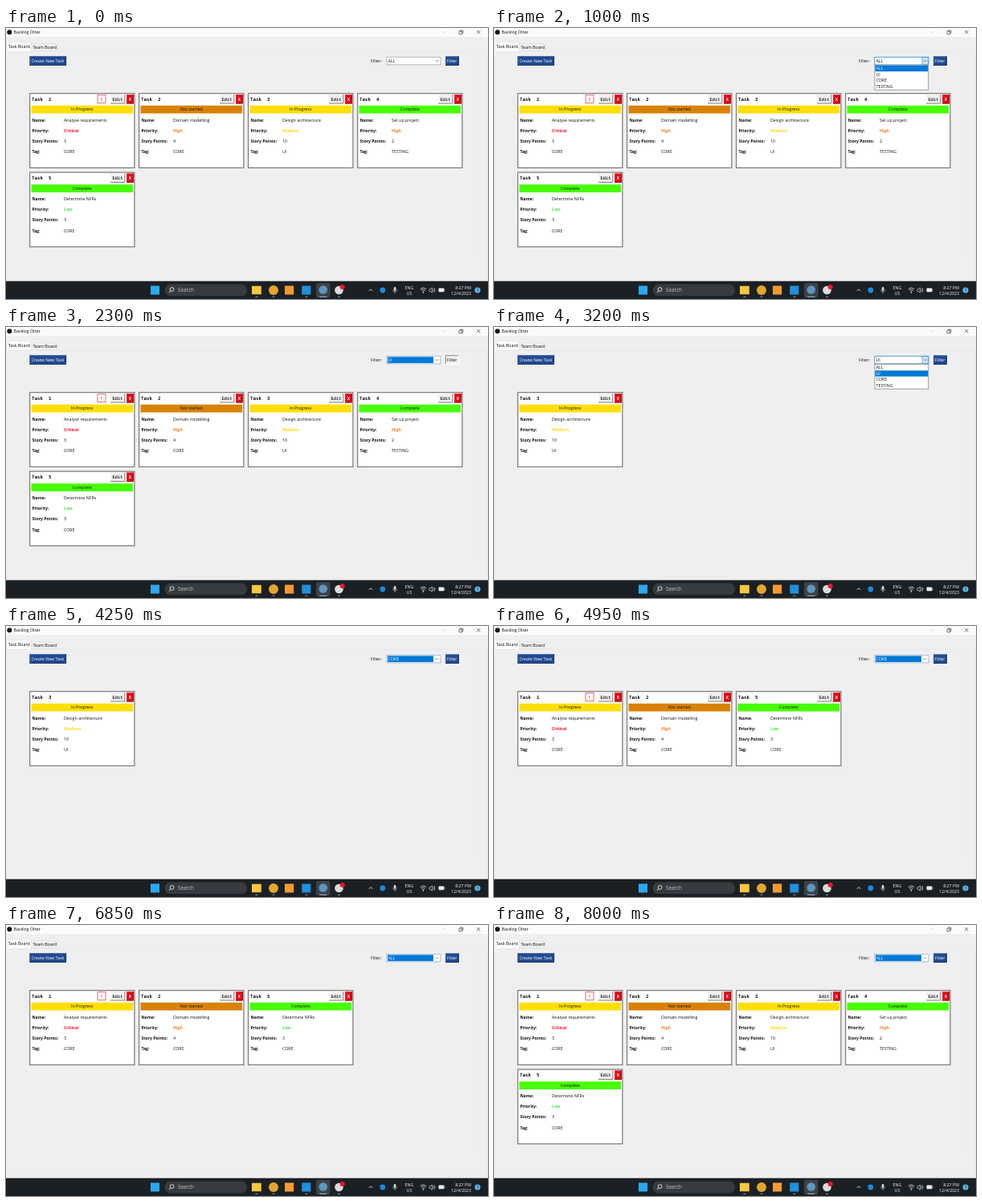
Recreate the animation shown at these times as an HTML page. Size 600 px wide and 338 px high, loop 8050 ms.

```html
<!DOCTYPE html>
<html lang="en">
<head>
<meta charset="utf-8">
<title>Task board</title>
<style>
  html, body { margin: 0; width: 100%; height: 100%; overflow: hidden; background: #f0eff0; }
  svg { display: block; width: 100vw; height: 100vh; }
  text { font: 5.3px "Open Sans", "Noto Sans", sans-serif; white-space: pre; }
  .bold { font-weight: 700; font-size: 5.2px; }
  .head { font: 700 5.8px "DejaVu Sans Mono", monospace; }
  .mono { font: 700 5.5px "Liberation Mono", monospace; }
  .search { font-size: 6.3px; }
</style>
</head>
<body>
<svg viewBox="0 0 600 338">
  <g id="frame"></g>
  <g id="cards"></g>
  <g id="filter"></g>
</svg>
<script>
const LOOP = 8050;
const BLUE = '#214a91', PICK = '#0078d7';
const TAGS = ['ALL', 'UI', 'CORE', 'TESTING'];
const STATUS = { 'In Progress': '#ffdf00', 'Not started': '#d88200', 'Complete': '#48ff00' };
const PRIORITY = { Critical: '#f0102c', High: '#f08028', Medium: '#ffdc1c', Low: '#48e848' };
const TASKS = [
  { id: 1, status: 'In Progress', name: 'Analyse requirements', priority: 'Critical', points: 3, tag: 'CORE' },
  { id: 2, status: 'Not started', name: 'Domain modelling', priority: 'High', points: 4, tag: 'CORE' },
  { id: 3, status: 'In Progress', name: 'Design architecture', priority: 'Medium', points: 10, tag: 'UI' },
  { id: 4, status: 'Complete', name: 'Set up project', priority: 'High', points: 2, tag: 'TESTING' },
  { id: 5, status: 'Complete', name: 'Determine NFRs', priority: 'Low', points: 3, tag: 'CORE' }
];

// shown: filter on the board, value: combo text, hover: open list row
const STEPS = [
  { at: 0, shown: 'ALL', value: 'ALL' },
  { at: 800, shown: 'ALL', value: 'ALL', hover: 'ALL' },
  { at: 1350, shown: 'ALL', value: 'ALL', hover: 'UI' },
  { at: 1650, shown: 'ALL', value: 'UI', picked: true },
  { at: 2250, shown: 'ALL', value: 'UI', picked: true, pressed: true },
  { at: 2400, shown: 'UI', value: 'UI', picked: true },
  { at: 3150, shown: 'UI', value: 'UI', hover: 'UI' },
  { at: 3650, shown: 'UI', value: 'UI', hover: 'CORE' },
  { at: 3950, shown: 'UI', value: 'CORE', picked: true },
  { at: 4650, shown: 'UI', value: 'CORE', picked: true, pressed: true },
  { at: 4800, shown: 'CORE', value: 'CORE', picked: true },
  { at: 5550, shown: 'CORE', value: 'CORE', hover: 'CORE' },
  { at: 6150, shown: 'CORE', value: 'CORE', hover: 'UI' },
  { at: 6250, shown: 'CORE', value: 'CORE', hover: 'ALL' },
  { at: 6550, shown: 'CORE', value: 'ALL', picked: true },
  { at: 7250, shown: 'CORE', value: 'ALL', picked: true, pressed: true },
  { at: 7400, shown: 'ALL', value: 'ALL', picked: true }
];

const rect = (x, y, w, h, fill, more = '') =>
  `<rect x="${x}" y="${y}" width="${w}" height="${h}" fill="${fill}" ${more}/>`;
const circle = (x, y, r, fill, more = '') =>
  `<circle cx="${x}" cy="${y}" r="${r}" fill="${fill}" ${more}/>`;
const line = (d, stroke, width = 0.7) =>
  `<path d="${d}" fill="none" stroke="${stroke}" stroke-width="${width}"/>`;
const text = (x, y, str, { fill = '#111', cls = '', anchor = 'start' } = {}) =>
  `<text x="${x}" y="${y}" fill="${fill}" class="${cls}" text-anchor="${anchor}">${str}</text>`;

// Button with light top-left and dark bottom-right edges
function button(x, y, w, h, fill, light, dark) {
  return rect(x, y, w, h, fill) +
    line(`M${x + .4} ${y + h}V${y + .4}H${x + w}`, light) +
    line(`M${x} ${y + h - .4}H${x + w - .4}V${y}`, dark, 0.9);
}

function card(task, slot) {
  const x = 29 + slot % 4 * 136, y = 81 + Math.floor(slot / 4) * 98.5;
  const rows = [['Name:', task.name], ['Priority:', task.priority],
    ['Story Points:', task.points], ['Tag:', task.tag]];
  let out = rect(.6, .6, 130.3, 92.8, '#fff', 'stroke="#808080" stroke-width="1.3"') +
    text(3, 9.6, 'Task  ' + task.id, { cls: 'head' });
  if (task.priority === 'Critical') {
    out += rect(85, 2.7, 10, 10, '#fff', 'stroke="#e04850" stroke-width=".8"') +
      text(90, 9.6, '!', { cls: 'mono', fill: '#e01020', anchor: 'middle' });
  }
  out += button(101, 2, 18.3, 11.4, '#f0f0f0', '#fafafa', '#777') +
    text(110, 9.6, 'Edit', { cls: 'mono', fill: '#333', anchor: 'middle' }) +
    button(121, 2, 8.8, 11.4, '#e60012', '#f04850', '#8c1018') +
    text(125.3, 9.6, 'X', { cls: 'mono', fill: '#fff', anchor: 'middle' }) +
    rect(2.5, 15.7, 126.6, 9.8, STATUS[task.status]) +
    text(65.8, 22.4, task.status, { anchor: 'middle' });
  rows.forEach(([label, value], i) => {
    const base = 35.6 + i * 13.15;
    out += text(3.4, base, label, { cls: 'bold' }) +
      text(43, base, value, i === 1 ? { cls: 'bold', fill: PRIORITY[value] } : {});
  });
  return `<g transform="translate(${x} ${y})">${out}</g>`;
}

function filterBar({ value, hover, picked, pressed }) {
  const edge = hover ? PICK : picked ? '#7da7cf' : '#999';
  let out = text(454, 42.9, 'Filter:') +
    rect(473.9, 36.2, 67, 9.7, '#fff', `stroke="${edge}" stroke-width=".7"`);
  if (picked) out += rect(475, 37.3, 57, 7.6, PICK);
  if (hover) out += rect(533, 36.5, 7.6, 9.1, '#cce4f7', `stroke="${PICK}" stroke-width=".5"`);
  out += text(475.5, 43, value, { fill: picked ? '#fff' : '#111' }) +
    line('M535 40.2l1.8 1.8 1.8-1.8', '#444', 0.6);
  out += pressed
    ? button(547, 35.3, 16.8, 11.5, '#f0f0f0', '#666', '#fff')
    : button(547, 35.3, 16.8, 11.5, BLUE, '#5478b4', '#152f5e');
  out += text(555.3, 43, 'Filter', { fill: pressed ? '#111' : '#fff', anchor: 'middle' });
  if (hover) {
    out += rect(474, 46.3, 66.8, 30.9, '#fff', 'stroke="#777" stroke-width=".7"');
    TAGS.forEach((tag, i) => {
      const y = 46.8 + i * 7.5, on = tag === hover;
      if (on) out += rect(474.5, y, 65.8, 7.4, PICK);
      out += text(475.5, y + 5.5, tag, { fill: on ? '#fff' : '#111' });
    });
  }
  return out;
}

function windowFrame() {
  return rect(0, 0, 600, 316, '#f0eff0') + rect(0, 0, 600, 11, '#fcfbfc') +
    circle(4.3, 5.3, 3, '#111') + text(9.5, 7.3, 'Backlog Otter') +
    line('M542 5.2h5', '#ccc', 0.6) +
    line('M564 4.2h3.6v3.6h-3.6zM565.2 4v-1h3.6v3.6h-1', '#222', 0.6) +
    line('M586 3l4.4 4.4m0-4.4l-4.4 4.4', '#222', 0.6) +
    rect(.8, 17.5, 30.5, 12, '#fcfbfc', 'stroke="#ddd" stroke-width=".5"') +
    rect(31.3, 19.3, 33.5, 9.6, '#f0eff0', 'stroke="#ddd" stroke-width=".5"') +
    text(2.7, 25.3, 'Task Board') + text(33.5, 26.3, 'Team Board') +
    line('M31 29.3H599.5V315', '#e4e3e4', 0.6) + line('M586.3 30V282', '#e7e6e7', 0.6) +
    button(29.3, 35, 45.7, 11.7, BLUE, '#5478b4', '#152f5e') +
    text(52, 42.9, 'Create New Task', { fill: '#fff', anchor: 'middle' });
}

function taskbar() {
  const white = { fill: '#f4f4f4' };
  const marks = [312, 333, 374, 414.5].map(x => rect(x - 1.5, 334.8, 3, 1, '#999')).join('');
  return rect(0, 315.7, 600, 22.3, '#1b2025') +
    rect(180, 321.5, 11, 11, '#2ba8ee') +
    rect(197.5, 319.5, 102.5, 14.8, '#363b40', 'rx="7.4"') +
    circle(206.6, 326, 2.4, 'none', 'stroke="#eee" stroke-width=".9"') +
    line('M204.9 327.8l-2.1 2.2', '#eee', 0.9) +
    text(214, 329.2, 'Search', { fill: '#c8cacc', cls: 'search' }) +
    rect(306, 321.8, 11.8, 10.4, '#f8c73c') +
    circle(333, 327, 6, '#e2a52e') +
    rect(347, 321.5, 11.2, 11, '#f39a32') +
    rect(368.3, 321.5, 11, 11, '#1f91dc') +
    rect(386, 318, 17.5, 18, '#3d4247', 'rx="2"') + circle(394.8, 326.5, 5.3, '#5f95bd') +
    rect(390, 334.8, 9.5, 1, '#8fc4e8') +
    circle(414.5, 327, 5.3, '#dadada') + circle(418.7, 323, 3, '#e81828') + marks +
    line('M451.8 328l2.3-2.3 2.3 2.3', '#eee', 0.8) +
    circle(468.8, 327, 3.4, '#198be0') +
    rect(482.8, 323, 2.6, 4.8, '#ddd', 'rx="1.3"') +
    line('M481.7 326.5a2.4 2.5 0 0 0 4.8 0M484.1 329v2', '#ddd', 0.6) +
    text(502, 325.6, 'ENG', { ...white, anchor: 'middle' }) +
    text(502, 333, 'US', { ...white, anchor: 'middle' }) +
    line('M515.7 325.5q3.7-3 7.4 0M517 327.3q2.4-2 4.8 0M518.3 329q1.1-.9 2.2 0', '#eee', 0.8) +
    circle(519.4, 330, .7, '#eee') +
    line('M527 325.7h1.4l2-1.8v6.4l-2-1.8h-1.4zM531.8 325.3q1.2 1.8 0 3.5M533 324.2q2 2.8 0 5.6', '#eee', 0.6) +
    rect(538.5, 324.5, 6.8, 4.8, '#eee', 'rx=".8"') + rect(545.5, 326, .7, 1.8, '#eee') +
    text(579, 325.6, '8:27 PM', { ...white, anchor: 'end' }) +
    text(579, 333, '12/4/2023', { ...white, anchor: 'end' }) +
    circle(587, 327, 3.6, '#5fb4e4') + line('M586.4 325.8l.8-.6v3.6', '#1b2025', 0.6);
}

const layer = id => document.getElementById(id);
let current = null;

function render(ms) {
  const time = ms % LOOP;
  const step = STEPS.findLast(s => s.at <= time);
  if (step === current) return;
  current = step;
  layer('cards').innerHTML = TASKS
    .filter(task => step.shown === 'ALL' || task.tag === step.shown)
    .map(card).join('');
  layer('filter').innerHTML = filterBar(step);
}

layer('frame').innerHTML = windowFrame() + taskbar();
const start = performance.now();
function tick() {
  render(performance.now() - start);
  requestAnimationFrame(tick);
}
tick();
</script>
</body>
</html>
```
